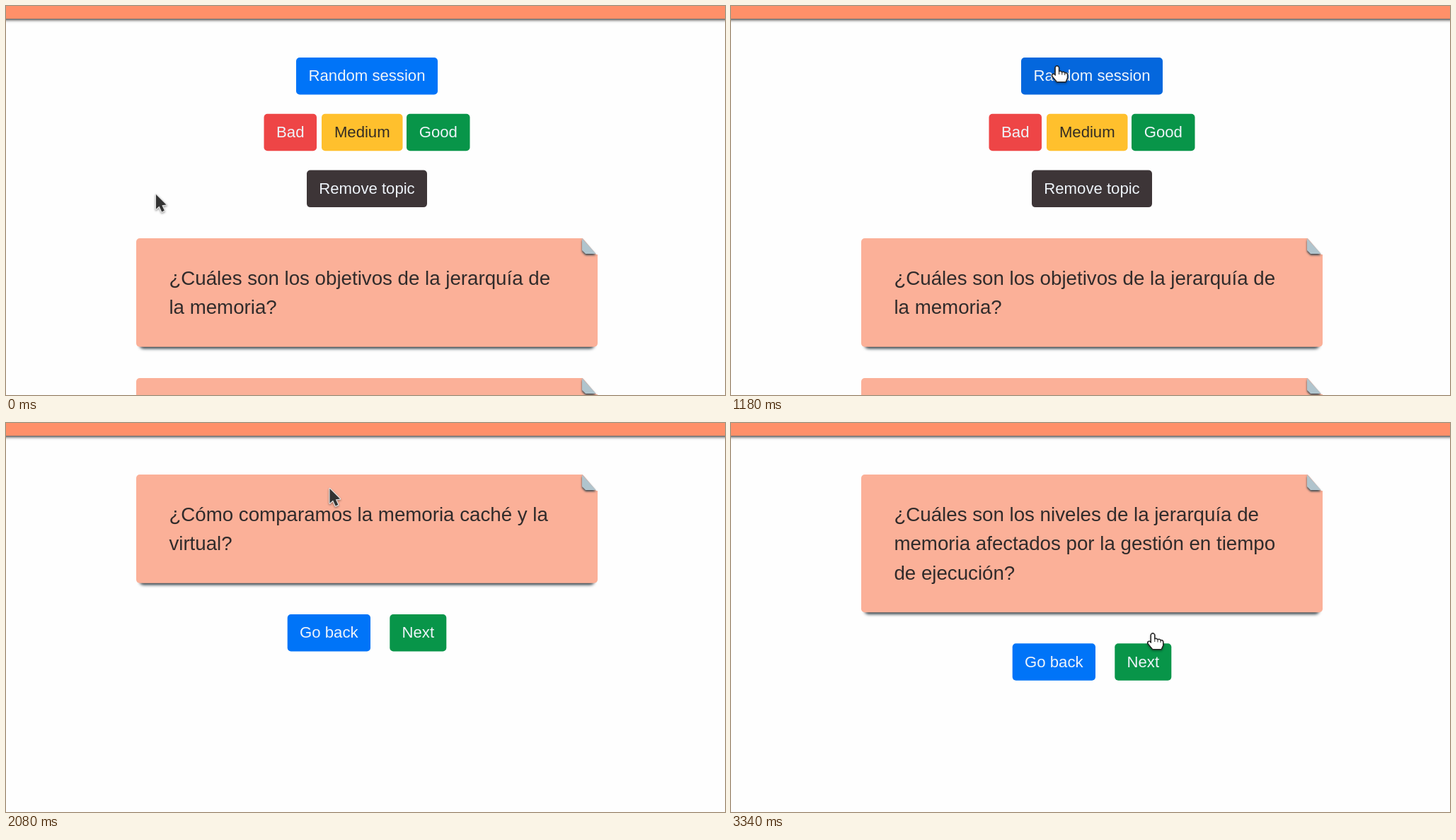
Recreate the animation shown at these times as an HTML page with a canvas. Size 1016 by 551 pixels, loop 3420 ms.

```html
<!DOCTYPE html>
<html lang="en">
<head>
<meta charset="utf-8">
<title>Flash cards</title>
<style>
html, body { margin: 0; width: 100%; height: 100%; overflow: hidden; background: #fefefe; }
canvas { display: block; }
</style>
</head>
<body>
<canvas id="stage" width="1016" height="551"></canvas>
<script>
const ctx = document.getElementById('stage').getContext('2d');
const LOOP = 3420, FONT = '"Liberation Sans", Arial, sans-serif';

const BLUE = [0, 116, 248], BLUE_HOVER = [4, 103, 221];
const GREEN = [8, 149, 73], GREEN_HOVER = [7, 122, 58];
const DARK = [61, 53, 55], DARK_HOVER = [40, 35, 37];
const RED = [238, 69, 70], YELLOW = [255, 192, 45];

// Pointer stops: time, x, y
const PATH = [
  [0, 212, 267], [150, 132, 240], [360, 452, 250], [540, 405, 69],
  [560, 405, 69], [900, 458, 86], [1500, 457.5, 86], [1660, 457.5, 93],
  [2080, 457.5, 93], [2420, 472, 284], [2520, 490, 295], [2700, 593, 299]
];
const HAND_TIMES = [[330, 440], [640, 1300], [2390, 2530], [2610, LOOP]];

const ARROW = new Path2D('M0 0V20.5L4.6 16.4L8.2 24.5L11.8 22.8L8.3 15.2L14.5 14.6Z');
const HAND = new Path2D('M-2.5 2Q0 -2 2.5 2V8Q5 6.5 7 9Q9.5 7.5 11 10Q14 9 14.5 12V17L12 22.5H0L-7 14Q-7.5 11 -4.5 11.5L-2.5 13.5Z');

const clamp = v => Math.max(0, Math.min(1, v));
const fade = (t, on, off = Infinity) => clamp((t - on) / 150) - clamp((t - off) / 150);
const mix = (a, b, k) => `rgb(${a.map((v, i) => v + (b[i] - v) * k)})`;

function shadow(color, blur, y) {
  ctx.shadowColor = color;
  ctx.shadowBlur = blur;
  ctx.shadowOffsetY = y;
}

function box(x, y, w, h, color, r = 5) {
  ctx.fillStyle = color;
  ctx.beginPath();
  ctx.roundRect(x, y, w, h, r);
  ctx.fill();
}

function button(label, x, y, w, base, over = base, hover = 0, focus = 0) {
  if (focus) box(x - 3, y - 3, w + 6, 58.5, `rgba(150,200,252,${focus * .85})`, 7);
  box(x, y, w, 52.5, mix(base, over, hover));
  ctx.fillStyle = base === YELLOW ? '#332c24' : '#eef4fa';
  ctx.font = '22.15px ' + FONT;
  ctx.textAlign = 'center';
  ctx.fillText(label, x + w / 2, y + 33.3);
}

function polygon(color, ...points) {
  ctx.fillStyle = color;
  ctx.beginPath();
  points.forEach(p => ctx.lineTo(...p));
  ctx.fill();
}

function card(y, lines) {
  const h = 71 + 41.4 * lines.length;
  ctx.save();
  shadow('#2b3a42', 4, 3);
  box(189, y + 10, 642, h - 10.5, '#fbb098');
  ctx.restore();
  box(184, y, 652, h, '#fbb098');
  polygon('#fefefe', [814, y - 1], [837, y - 1], [837, y + 23], [834, y + 23]);
  ctx.save();
  shadow('#3a454b', 3, 2);
  polygon('#b0c4cd', [814, y], [833.5, y + 22], [819, y + 22], [814, y + 17]);
  ctx.restore();
  ctx.fillStyle = '#302b2b';
  ctx.font = '27.7px ' + FONT;
  ctx.textAlign = 'left';
  lines.forEach((line, i) => ctx.fillText(line, 230.4, y + 66 + 41.4 * i));
}

function topicPage(t) {
  button('Random session', 410, 73, 200, BLUE, BLUE_HOVER, fade(t, 640), fade(t, 1190));
  button('Bad', 364.5, 152.7, 74.5, RED);
  button('Medium', 446, 152.7, 114.5, YELLOW);
  button('Good', 566, 152.7, 89.5, GREEN);
  button('Remove topic', 425, 232.6, 170, DARK, DARK_HOVER, fade(t, 330, 390));
  card(329, ['¿Cuáles son los objetivos de la jerarquía de', 'la memoria?']);
  card(527, ['']);
}

function sessionPage(t) {
  const moved = t >= 3180;
  card(73, moved
    ? ['¿Cuáles son los niveles de la jerarquía de', 'memoria afectados por la gestión en tiempo', 'de ejecución?']
    : ['¿Cómo comparamos la memoria caché y la', 'virtual?']);
  const y = moved ? 312.2 : 271;
  button('Go back', 397.7, y, 117.3, BLUE, BLUE_HOVER, fade(t, 2390, 2550));
  button('Next', 542.3, y, 80, GREEN, GREEN_HOVER, fade(t, 2620, 3180), moved ? 0 : fade(t, 2900));
}

function pointerAt(t) {
  const i = PATH.findIndex(p => p[0] > t);
  if (i < 0) return PATH[PATH.length - 1].slice(1);
  const [t0, x0, y0] = PATH[i - 1], [t1, x1, y1] = PATH[i];
  const u = (t - t0) / (t1 - t0), k = u * u * (3 - 2 * u);
  return [x0 + (x1 - x0) * k, y0 + (y1 - y0) * k];
}

function pointer(t) {
  const hand = HAND_TIMES.some(([a, b]) => t >= a && t < b);
  const [x, y] = pointerAt(t);
  ctx.save();
  ctx.translate(x + (hand ? 3 : 0), y - (hand ? 1 : 0));
  ctx.lineJoin = 'round';
  shadow('rgba(0,0,0,.4)', 3, 1.5);
  ctx.lineWidth = hand ? 2 : 2.4;
  ctx.strokeStyle = hand ? '#222' : '#e4e4e4';
  ctx.stroke(hand ? HAND : ARROW);
  shadow('transparent', 0, 0);
  ctx.fillStyle = hand ? '#fff' : '#333';
  ctx.fill(hand ? HAND : ARROW);
  if (hand) {
    ctx.lineWidth = 1;
    ctx.stroke(HAND);
    ctx.stroke(new Path2D('M2.8 8V12M7 9V12.5M11 10V13'));
  }
  ctx.restore();
}

function draw(now) {
  const t = now % LOOP;
  ctx.fillStyle = '#fefefe';
  ctx.fillRect(0, 0, 1016, 551);
  ctx.save();
  shadow('#444', 4, 2);
  ctx.fillStyle = '#ff9069';
  ctx.fillRect(-10, -10, 1036, 28);
  ctx.restore();
  (t < 1500 ? topicPage : sessionPage)(t);
  pointer(t);
}

const start = performance.now();
function tick() {
  draw(performance.now() - start);
  requestAnimationFrame(tick);
}
tick();
</script>
</body>
</html>
```
